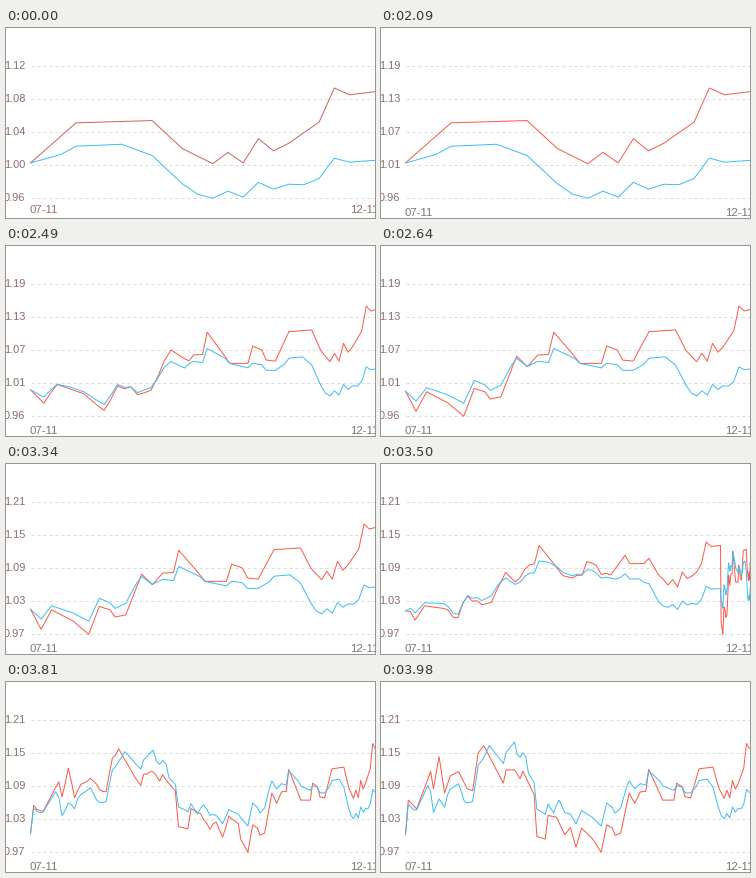
A matplotlib script that plays this animation: 369 px wide and 190 px high, repeating every 5.52 s.

```python
import matplotlib.pyplot as plt
import numpy as np
from matplotlib.animation import FuncAnimation

WIDTH, HEIGHT, DPI = 369, 190, 100
LOOP_MS, INTERVAL = 5520, 20
LEFT, RIGHT = 24, 373.4
TOP, BOTTOM = 59.5, 169.8        # highest and lowest point of the curves
GRID_BOTTOM, ROW = 169, 33
STEP_MS, MORPH_MS = 80, 530
SWITCHES = (2080, 3340)
WINDOWS = (24, 67, 126)          # one, three and six months of trading days
BETA = .6                        # how strongly blue follows red

# Turning points as (day, gain in per mille); straight runs in between.
RED_TURNS = (
    (0, 0), (1, 63), (4, 47), (9, 115), (10, 84), (12, 142), (14, 76),
    (16, 107), (19, 115), (22, 84), (24, 80), (26, 149), (28, 162),
    (35, 94), (36, 118), (39, 118), (41, 102), (42, 116), (46, 73),
    (47, -3), (50, -8), (51, 35), (54, 32), (57, 0), (59, 13), (61, -23),
    (63, 12), (67, -8), (70, -32), (72, 18), (74, 12), (75, -1), (77, 3),
    (80, 76), (82, 57), (84, 78), (86, 79), (87, 119), (90, 86), (92, 63),
    (96, 63), (97, 94), (99, 87), (100, 69), (102, 67), (105, 120),
    (110, 123), (112, 86), (114, 66), (115, 81), (116, 67), (117, 99),
    (118, 83), (119, 93), (121, 121), (122, 166), (123, 157), (125, 162))
SPREAD_TURNS = (
    (0, 0), (1, 18), (3, 14), (8, 29), (10, -10), (12, -20), (15, 17),
    (19, 24), (21, 5), (24, 12), (26, 37), (28, 43), (30, 77), (35, 73),
    (39, 98), (40, 80), (43, 79), (44, 55), (50, 42), (53, 20), (55, 50),
    (59, 30), (63, 37), (70, 35), (72, 47), (75, 40), (79, 54), (86, 43),
    (91, 53), (96, 43), (97, 33), (102, 36), (104, 26), (108, 28),
    (113, -11), (119, -8), (120, -17), (125, -17))


def trace(turns):
    return np.interp(np.arange(WINDOWS[-1]), *zip(*turns))


def make_window(days):
    """Rebase the last days to 1 and scale them to the plot."""
    values = [p[-days:] / p[-days] for p in HISTORY]
    low, high = np.min(values), np.max(values)
    unit = (high - low) / (BOTTOM - TOP)
    x = np.linspace(LEFT, RIGHT, days)
    curves = [(x, TOP + (high - v) / unit) for v in values]
    labels = [f"{low + unit * ROW * i:.2f}" for i in range(5)]
    return curves, labels


red_gain = trace(RED_TURNS)
blue_gain = BETA * red_gain + trace(SPREAD_TURNS)
HISTORY = (1 + red_gain / 1000, 1 + blue_gain / 1000)
VIEWS = [make_window(days) for days in WINDOWS]


def morph(old, new, p):
    """Shared points glide; added ones slide in from the right edge."""
    n = len(old[0])
    x0 = np.full(len(new[0]), RIGHT)
    y0 = new[1].copy()
    x0[:n], y0[:n] = old
    return x0 + (new[0] - x0) * p, y0 + (new[1] - y0) * p


def ease(ms):
    return .5 - .5 * np.cos(np.pi * min(1, ms / MORPH_MS))


def px(size):
    return size * 72 / DPI


plt.rcParams["font.family"] = "Liberation Sans"
fig = plt.figure(figsize=(WIDTH / DPI, HEIGHT / DPI), dpi=DPI, facecolor="white")
ax = fig.add_axes([0, 0, 1, 1])
ax.set_xlim(-.5, WIDTH - .5)
ax.set_ylim(HEIGHT - .5, -.5)
ax.axis("off")

tick_texts = []
for row in range(5):
    y = GRID_BOTTOM - ROW * row
    ax.plot([LEFT, RIGHT], [y, y], color="#dcdcdc", lw=px(1),
            dashes=(3, 3), dash_capstyle="butt")
    tick_texts.append(ax.text(19, y + 3.5, "", ha="right", va="baseline",
                              fontsize=px(11), color="#8c6d6b"))

date_texts = [ax.text(x, 184, text, ha=ha, va="baseline", fontsize=px(11.4))
              for x, text, ha in ((LEFT - .5, "07-11", "left"),
                                  (RIGHT - 1, "12-11", "right"))]
red_line, = ax.plot([], [], color="#fb5a4b", lw=px(1))
blue_line, = ax.plot([], [], color="#3fbdf5", lw=px(1))


def update(frame):
    ms = frame * INTERVAL
    view = sum(ms >= start for start in SWITCHES)
    curves, labels = VIEWS[view]
    if view:
        elapsed = (ms - SWITCHES[view - 1]) // STEP_MS * STEP_MS
        p = ease(elapsed)
        curves = [morph(old, new, p)
                  for old, new in zip(VIEWS[view - 1][0], curves)]
    red_line.set_data(*curves[0])
    blue_line.set_data(*curves[1])
    red_line.set_color("#fb5a4b" if view else "#c8675c")
    for text, label in zip(tick_texts, labels):
        text.set_text(label)
    for text in date_texts:
        text.set_y(187.5 if view else 184.5)
        text.set_color("#7a7473" if view else "#946c6a")
    return [red_line, blue_line, *tick_texts, *date_texts]


anim = FuncAnimation(fig, update, frames=LOOP_MS // INTERVAL,
                     interval=INTERVAL, repeat=True, repeat_delay=0)
plt.show()
```
